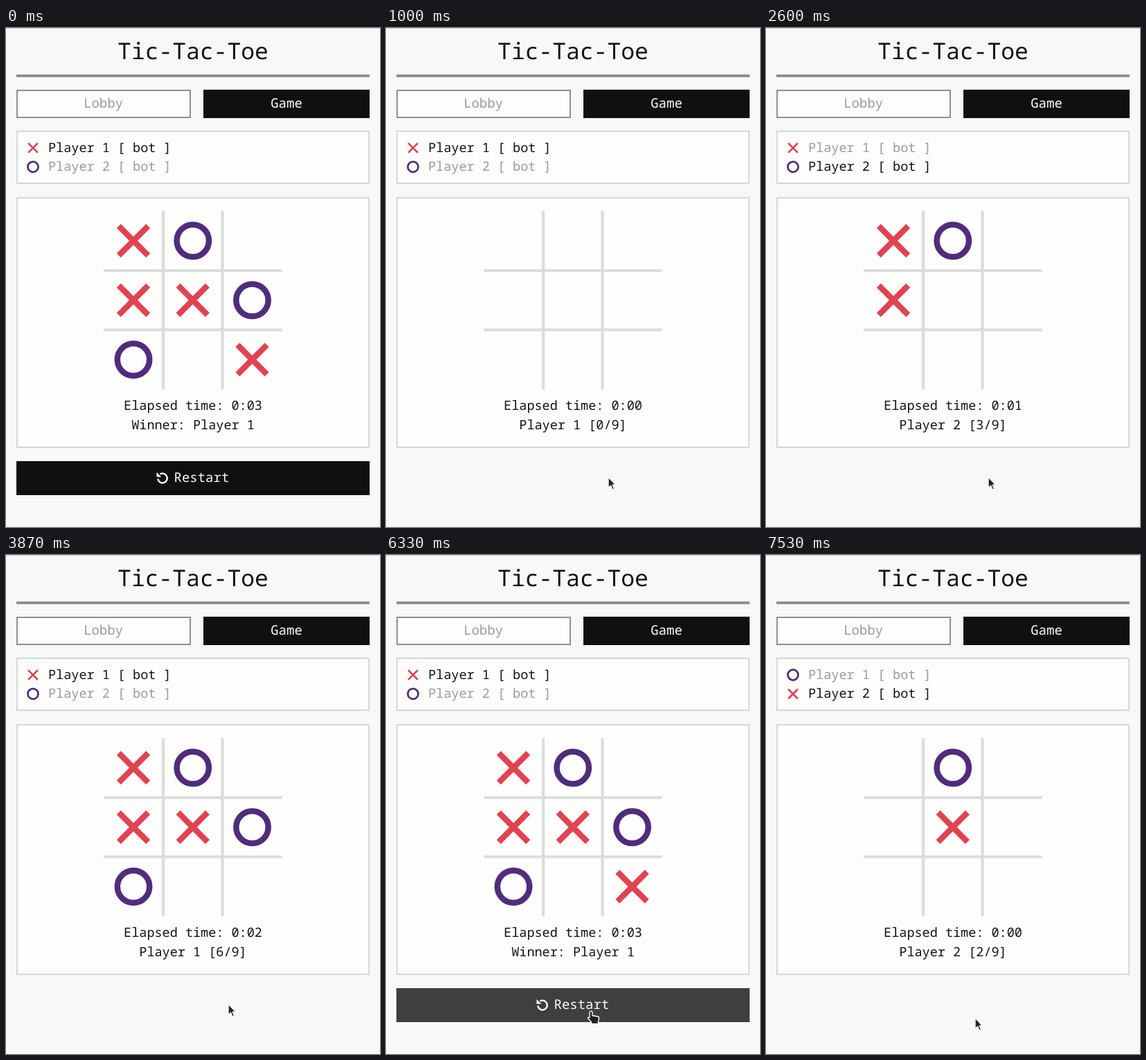
Write an HTML page that moves like this. It is 540 by 720 pixels and loops after 8 s.

```html
<!DOCTYPE html>
<html lang="en">
<head>
<meta charset="utf-8">
<title>Tic-Tac-Toe</title>
<style>
  html, body { margin: 0; width: 100%; height: 100%; overflow: hidden; background: #f7f9f7; }
  svg { display: block; width: 540px; height: 720px; }
  text { font: 18.5px "Noto Sans Mono", monospace; fill: #111311; text-rendering: geometricPrecision; white-space: pre; }
  .mid { text-anchor: middle; }
  .title { font-size: 33px; }
  .btn { font-size: 19px; }
  .light { fill: #fbfcfb; }
  .dim { fill: #999b99; }
  .dark { fill: #0f110f; }
  .panel { fill: #fdfdfc; stroke: #d6d8d6; stroke-width: 2; }
  .grid { stroke: #dcdcdc; stroke-width: 4.2; }
  .hover .dark { fill: #3f3f3e; }
  .cursor { fill: #222; stroke: #fff; stroke-width: 1.3; stroke-linejoin: round; }
</style>
</head>
<body>
<svg viewBox="0 0 540 720">
  <defs>
    <path id="x" d="M-21.2-21.2 21.2 21.2M21.2-21.2-21.2 21.2" stroke="#e04352" stroke-width="8.5"/>
    <circle id="o" r="23.2" fill="none" stroke="#4f2d7b" stroke-width="8.5"/>
  </defs>

  <rect width="540" height="1" fill="#c9cbc9"/>
  <text class="mid title" x="270" y="45">Tic-Tac-Toe</text>
  <rect x="15" y="67" width="510" height="4" fill="#8f918f"/>

  <rect x="16" y="90" width="250" height="39" fill="#fdfdfc" stroke="#8f918f" stroke-width="2"/>
  <text class="mid btn dim" x="140.5" y="115">Lobby</text>
  <rect class="dark" x="285" y="89" width="240" height="41"/>
  <text class="mid btn light" x="405" y="115">Game</text>

  <rect class="panel" x="16" y="149" width="508" height="75"/>
  <use id="icon1" transform="translate(39 173) scale(.325)"/>
  <use id="icon2" transform="translate(39 200.3) scale(.325)"/>
  <text id="name1" x="61" y="179">Player 1 [ bot ]</text>
  <text id="name2" x="61" y="206">Player 2 [ bot ]</text>

  <rect class="panel" x="16" y="245" width="508" height="360"/>
  <path class="grid" d="M227 264V521.500M312.500 264V521.500M141 350H398.500M141 435.500H398.500"/>
  <g id="board"></g>
  <text class="mid" id="clock" x="270" y="550.500"></text>
  <text class="mid" id="status" x="270" y="578.700"></text>

  <g id="restart">
    <rect class="dark" x="15" y="625" width="510" height="49"/>
    <path d="M222.500 643.700A6.800 6.800 0 1 1 219.200 650.500" fill="none" stroke="#fbfcfb" stroke-width="2.500"/>
    <path class="light" d="M217.500 641V647.800H224.300Z"/>
    <text class="btn light" x="242.500" y="655">Restart</text>
  </g>

  <g id="cursor" class="cursor">
    <path id="arrow" d="M0 0V15.500L3.600 12.200 6 18 8.600 17 6.200 11.200 10.500 11Z"/>
    <path id="hand" d="M-2 1.500Q0-1.500 2 1.500V6.500L10 8Q12 8.500 11.500 11L10.500 15V18.500H.5V16L-4.500 10.500Q-5 8-2 9.500V1.500Z"/>
  </g>
</svg>
<script>
const LOOP = 8000, TICK = 1000 / 15;
const $ = id => document.getElementById(id);

// Times are in ticks; each move is [tick, cell], X always opens.
const first = { players: 'xo', moves: [[21, 0], [29, 1], [36, 3], [44, 6], [51, 4], [58, 5], [67, 8]], seconds: [39, 53, 68], end: 67 };
const second = { players: 'ox', moves: [[105, 4], [112, 1]], seconds: [], end: Infinity };
const START_1 = 13, START_2 = 99;

const path = [
  [4, 330, 698], [8, 321, 648], [85, 321, 648], [86, 319, 650],
  [90, 310, 700], [92, 303, 700], [95, 296, 658], [108, 296, 658], [113, 302, 668]
];

const marks = Array.from({ length: 9 }, (_, i) => {
  const mark = document.createElementNS('http://www.w3.org/2000/svg', 'use');
  const x = 184 + i % 3 * 85.75, y = 307 + Math.floor(i / 3) * 85.75;
  mark.setAttribute('transform', `translate(${x} ${y})`);
  $('board').append(mark);
  return mark;
});

const show = (el, on) => el.setAttribute('visibility', on ? 'visible' : 'hidden');
const setMark = (el, kind) => el.setAttribute('href', '#' + kind);

function cursorAt(tick) {
  const i = path.findIndex(p => p[0] > tick);
  if (i < 0) return path[path.length - 1].slice(1);
  if (i === 0) return path[0].slice(1);
  const [t0, x0, y0] = path[i - 1], [t1, x1, y1] = path[i];
  const k = (tick - t0) / (t1 - t0);
  return [x0 + (x1 - x0) * k, y0 + (y1 - y0) * k];
}

function drawGame(game, tick) {
  const done = game.moves.filter(m => m[0] <= tick);
  const over = tick >= game.end;
  const turn = over ? done.length - 1 : done.length;
  const active = game.players.indexOf('xo'[turn % 2]) + 1;

  marks.forEach((mark, cell) => {
    const n = done.findIndex(m => m[1] === cell);
    show(mark, n >= 0);
    if (n >= 0) setMark(mark, 'xo'[n % 2]);
  });
  for (const p of [1, 2]) {
    setMark($('icon' + p), game.players[p - 1]);
    $('name' + p).setAttribute('class', p === active ? '' : 'dim');
  }
  $('clock').textContent = 'Elapsed time: 0:0' + game.seconds.filter(s => s <= tick).length;
  $('status').textContent = over ? `Winner: Player ${active}` : `Player ${active} [${done.length}/9]`;
  show($('restart'), over);
  return over;
}

function draw(tick) {
  const over = tick < START_1 ? drawGame(first, START_2)
    : drawGame(tick < START_2 ? first : second, tick);
  const [x, y] = cursorAt(tick);
  const hover = over && tick !== first.end && tick >= path[0][0] && y < 674;
  const visible = tick >= path[0][0];
  $('restart').setAttribute('class', hover ? 'hover' : '');
  $('cursor').setAttribute('transform', `translate(${x} ${y})`);
  show($('arrow'), visible && !hover);
  show($('hand'), visible && hover);
}

let last = -1;
const origin = performance.now();
function frame(now) {
  const t = Math.max(0, now - origin) % LOOP;
  const tick = Math.floor((t + 5) / TICK) % (LOOP / TICK);
  if (tick !== last) draw(last = tick);
  requestAnimationFrame(frame);
}
draw(0);
requestAnimationFrame(frame);
</script>
</body>
</html>
```
